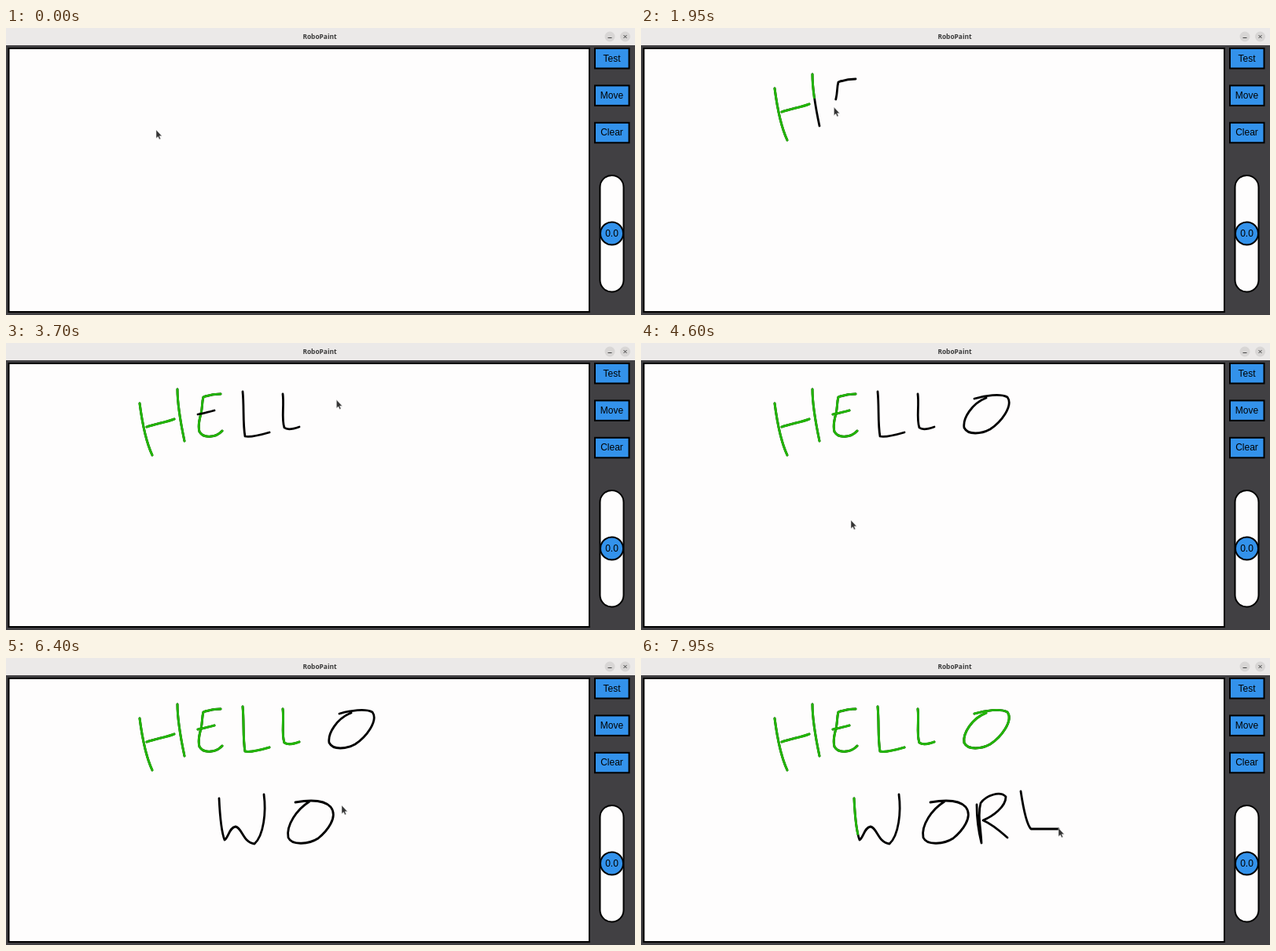
Recreate the animation shown at these times as an HTML page. Size 800 px wide and 366 px high, loop 8000 ms.

```html
<!DOCTYPE html>
<html lang="en">
<head>
<meta charset="utf-8">
<title>RoboPaint</title>
<style>
  html, body { margin: 0; width: 100%; height: 100%; overflow: hidden; background: #414043; }
  svg { display: block; width: 100%; height: 100%; }
  text { text-anchor: middle; font: 12px "Liberation Sans", Arial, sans-serif; }
  .title { font: bold 8.4px "Open Sans", "Noto Sans", sans-serif; fill: #3a3a3a; }
  .blue { fill: #3392eb; }
  .edge { stroke: #000; stroke-width: 2; }
  .mark { stroke: #444; stroke-width: 1; fill: none; }
  .line { fill: none; stroke-linecap: round; stroke-linejoin: round; }
  .ink { stroke: #000; stroke-width: 2.8; }
  .robot { stroke: #22b406; stroke-width: 3; }
</style>
</head>
<body>
<svg viewBox="0 0 800 366">
  <rect width="800" height="366" fill="#414043"/>
  <rect width="800" height="22" fill="#ebe9e8"/>
  <text class="title" x="399" y="14">RoboPaint</text>
  <circle cx="768" cy="11" r="6.5" fill="#d8d6d5"/>
  <circle cx="787.5" cy="11" r="6.5" fill="#d8d6d5"/>
  <path class="mark" d="M765.5 12.5h5M785.5 9l4 4m0-4l-4 4"/>
  <rect class="edge" x="3.5" y="26" width="738.5" height="336" fill="#fefdfd"/>
  <g id="buttons"></g>
  <rect class="edge" x="755.5" y="188" width="30" height="148.5" rx="15" fill="#fefdfd"/>
  <circle class="blue edge" cx="770.5" cy="262" r="14.5"/>
  <text x="770.5" y="266.3">0.0</text>
  <g id="drawing"></g>
  <path id="cursor" d="M0 0V10.5L2.4 8.4 4 12 5.6 11.3 4.1 7.7H7.2Z" fill="#333" stroke="#ddd" stroke-width=".5"/>
</svg>
<script>
const LOOP = 8000, INK_LAG = 50;

// d: pen path; ink: drawn with the mouse; robot: retraced in green; via: cursor stop before the stroke
const strokes = [
  { d: "M170 77C173 100 178 126 186 143", ink: [250, 600], robot: [650, 1080], via: [0, 191, 131] },
  { d: "M179 107C190 103 204 101 214 97", ink: [780, 950], robot: [1250, 1500] },
  { d: "M218 59C218 82 223 106 227 125", ink: [1200, 1480], robot: [1750, 2200], via: [1100, 221, 70] },
  { d: "M273 65C263 65 256 67 251 69C249 76 250 82 248 90C246 97 244 106 246 113C251 122 267 121 275 112",
    ink: [1700, 2150], robot: [2900, 3700] },
  { d: "M244 91Q254 89 265 86", ink: [2330, 2460], robot: [4150, 4320] },
  { d: "M301 62C303 82 301 102 304 119Q311 121 335 114", ink: [2660, 2930], robot: [4950, 5600] },
  { d: "M352 65C354 80 350 96 354 108Q359 112 373 107", ink: [3200, 3450], robot: [5900, 6330] },
  { d: "M424 71C438 67 457 64 466 69C474 80 458 101 444 110C433 116 416 118 411 108C409 96 421 77 439 70",
    ink: [3750, 4300], robot: [6480, 7480] },
  { d: "M271 179C272 200 274 222 278 232C283 229 284 216 292 215C300 216 302 236 316 237C328 226 331 196 328 174",
    ink: [4850, 5450], robot: [7620, 8900], via: [4600, 267, 227] },
  { d: "M368 184C385 181 404 180 413 190C423 203 408 221 397 230C386 237 364 240 359 229C356 213 370 193 386 183",
    ink: [5720, 6250], robot: [9200, 9900], via: [5700, 369, 190] },
  { d: "M427 187C427 205 430 224 433 236C432 215 428 200 432 185C439 175 457 169 464 177C464 190 447 202 435 207Q447 212 466 229",
    ink: [6550, 7200], robot: [9900, 9950], via: [6400, 427, 189] },
  { d: "M483 170C486 190 490 212 496 218L531 218", ink: [7550, 7900], robot: [9950, 9990] }
];

const $ = id => document.getElementById(id);
const progress = (t, [from, to]) => Math.min(1, Math.max(0, (t - from) / (to - from)));

$("buttons").innerHTML = ["Test", "Move", "Clear"].map((label, i) => {
  const y = 26 + i * 47.4;
  return `<rect class="blue edge" x="749" y="${y}" width="43.5" height="25.5"/>
    <text x="770.5" y="${y + 16.6}">${label}</text>`;
}).join("");

function addPath(kind, d) {
  const path = document.createElementNS("http://www.w3.org/2000/svg", "path");
  path.setAttribute("class", "line " + kind);
  path.setAttribute("d", d);
  $("drawing").append(path);
  return path;
}

for (const s of strokes) {
  s.black = addPath("ink", s.d);
  s.green = addPath("robot", s.d);
  s.length = s.black.getTotalLength();
  s.at = p => s.black.getPointAtLength(p * s.length);
}

function reveal(path, length) {
  path.style.display = length > 0 ? "" : "none";
  path.setAttribute("stroke-dasharray", `${length} 9999`);
}

function cursorAt(t) {
  let stop = null;
  for (const s of strokes) {
    const { x, y } = s.at(0);
    const next = [s.ink[0], x, y];
    for (const target of s.via ? [s.via, next] : [next]) {
      if (stop && t < target[0]) {
        const p = progress(t, [stop[0], target[0]]);
        const ease = p * p * (3 - 2 * p);
        return [1, 2].map(k => stop[k] + (target[k] - stop[k]) * ease);
      }
      stop = target;
    }
    const pen = s.at(progress(t, s.ink));
    if (t < s.ink[1]) return [pen.x, pen.y];
    stop = [s.ink[1], pen.x, pen.y];
  }
  return stop.slice(1);
}

function draw() {
  const t = performance.now() % LOOP;
  for (const s of strokes) {
    reveal(s.black, s.length * progress(t - INK_LAG, s.ink));
    reveal(s.green, s.length * progress(t, s.robot));
  }
  const [x, y] = cursorAt(t);
  $("cursor").setAttribute("transform", `translate(${x} ${y - 1})`);
  requestAnimationFrame(draw);
}
draw();
</script>
</body>
</html>
```
